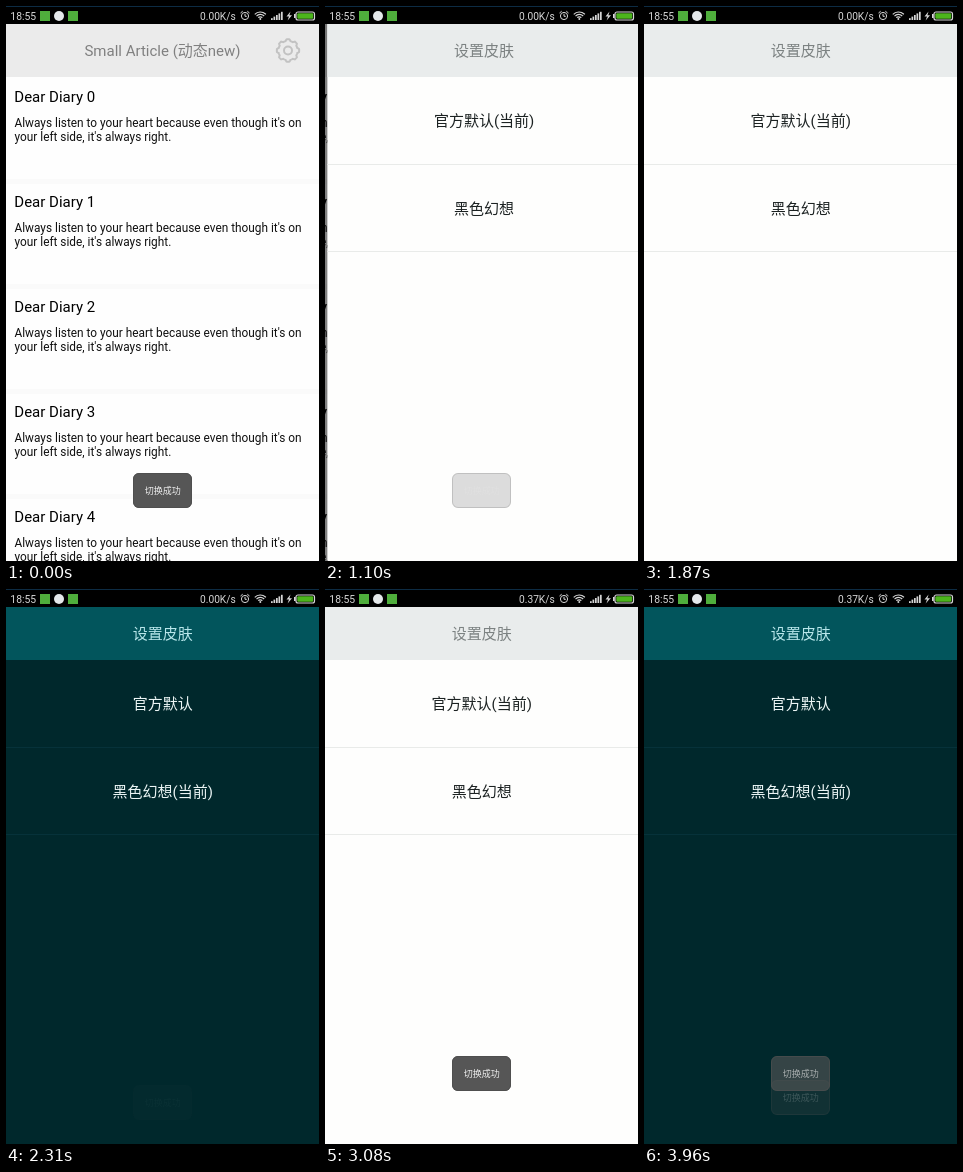
Animation of 313 by 555 pixels, one loop 4070 ms. Source, as an HTML page with a canvas:

```html
<!DOCTYPE html>
<html lang="zh">
<head>
<meta charset="utf-8">
<title>Skin switch</title>
<style>
html, body { margin: 0; width: 100%; height: 100%; overflow: hidden; background: #000; }
canvas { display: block; width: 313px; height: 555px; }
</style>
</head>
<body>
<canvas id="stage"></canvas>
<script>
const W = 313, H = 555, LOOP = 4070, STEP = 110;
const FONT = 'Roboto, "Noto Sans CJK SC", "Noto Sans CJK", sans-serif';
const canvas = document.getElementById('stage');
const ctx = canvas.getContext('2d');
const scale = window.devicePixelRatio || 1;
canvas.width = Math.round(W * scale);
canvas.height = Math.round(H * scale);

const LIGHT = { head: '#e9ecec', title: '#7c8282', bg: '#fefefd', text: '#1c2222', line: '#e9ebe9', press: '#e6e6e6' };
const DARK = { head: '#02555c', title: '#b8e6ea', bg: '#00282c', text: '#ebf5f5', line: '#06323a', press: '#0a3a40' };

const clamp = v => Math.max(0, Math.min(1, v));
const within = (t, a, b) => t >= a && t < b;

function rect(x, y, w, h, color) {
  ctx.fillStyle = color;
  ctx.fillRect(x, y, w, h);
}

function text(str, x, y, size, color, align = 'left') {
  ctx.font = `${size}px ${FONT}`;
  ctx.textAlign = align;
  ctx.fillStyle = color;
  ctx.fillText(str, x, y);
}

function roundRect(x, y, w, h, r) {
  ctx.beginPath();
  ctx.roundRect(x, y, w, h, r);
}

function arc(x, y, r, a = 0, b = Math.PI * 2) {
  ctx.beginPath();
  ctx.arc(x, y, r, a, b);
}

function poly(...pts) {
  ctx.beginPath();
  for (let i = 0; i < pts.length; i += 2) ctx.lineTo(pts[i], pts[i + 1]);
}

function gear(cx, cy) {
  ctx.strokeStyle = '#c2c2c2';
  ctx.lineWidth = 2;
  ctx.beginPath();
  for (let i = 0; i < 96; i++) {
    const a = i / 96 * Math.PI * 2;
    const r = 10.3 + 1.3 * clamp(0.5 + 1.2 * Math.cos(8 * a)) * 1.2 - 0.7;
    ctx.lineTo(cx + r * Math.cos(a), cy + r * Math.sin(a));
  }
  ctx.closePath();
  ctx.stroke();
  arc(cx, cy, 4);
  ctx.stroke();
}

function articles() {
  rect(0, 18, W, H - 18, '#fefefe');
  for (let i = 0; i < 5; i++) {
    const y = 71 + i * 105;
    text('Dear Diary ' + i, 8.3, y + 24.5, 15, '#000');
    text("Always listen to your heart because even though it's on", 8.5, y + 50.3, 11.85, '#111');
    text("your left side, it's always right.", 8.5, y + 64, 11.85, '#111');
    rect(0, y + 102, W, 5, '#fafafa');
  }
  rect(0, 18, W, 53, '#ebebeb');
  text('Small Article (动态new)', 156.5, 50.3, 15, '#808080', 'center');
  gear(282, 44.5);
}

function settings(dark, pressed) {
  const c = dark ? DARK : LIGHT;
  const now = '(当前)';
  const rows = ['官方默认' + (dark ? '' : now), '黑色幻想' + (dark ? now : '')];
  rect(0, 18, W, H - 18, c.bg);
  rect(0, 18, W, 53, c.head);
  text('设置皮肤', 156.7, 50.4, 15, c.title, 'center');
  rows.forEach((label, i) => {
    const y = 71 + i * 88;
    if (pressed === i) rect(0, y, W, 86, c.press);
    rect(0, y + 87 - i, W, 1, c.line);
    text(label, 156.7, y + 48.9, 15, c.text, 'center');
  });
}

function toast(alpha, dy = 0) {
  if (alpha <= 0) return;
  ctx.save();
  ctx.globalAlpha = Math.min(1, alpha);
  ctx.translate(0, dy);
  roundRect(127, 467, 59, 35, 6);
  ctx.fillStyle = '#565656';
  ctx.fill();
  roundRect(127.5, 467.5, 58, 34, 5.5);
  ctx.strokeStyle = '#4f4f4f';
  ctx.lineWidth = 1;
  ctx.stroke();
  text('切换成功', 156.7, 488.2, 9, '#f0f0f0', 'center');
  ctx.restore();
}

function risingToast(t, start) {
  const p = clamp((t - start) / 200);
  toast(p, 30 * (1 - p));
}

const fade = (t, start) => 1 - clamp((t - start) / 262);

function statusBar(speed) {
  const ink = '#d6d6d6';
  rect(0, 0, W, 18, '#000');
  rect(0, 0, W, 1, '#0d2c44');
  text('18:55', 4.3, 13.6, 10.4, ink);
  rect(34, 5, 10, 10, '#4fae3c');
  arc(53, 10, 5);
  ctx.fillStyle = '#e4e8ea';
  ctx.fill();
  rect(62, 5, 10, 10, '#4fae3c');
  text(speed, 194, 13.5, 10.2, ink);

  // alarm clock
  ctx.strokeStyle = ctx.fillStyle = ink;
  ctx.lineWidth = 1;
  arc(239, 10, 3.6);
  ctx.stroke();
  poly(239, 7.8, 239, 10.3, 240.8, 10.3);
  ctx.stroke();
  poly(234.5, 7, 236.7, 5.2);
  ctx.stroke();
  poly(241.3, 5.2, 243.5, 7);
  ctx.stroke();

  // wifi
  ctx.lineWidth = 1.2;
  for (const r of [2.8, 5.2, 7.6]) {
    arc(254.3, 13.6, r, -Math.PI * 0.76, -Math.PI * 0.24);
    ctx.stroke();
  }
  arc(254.3, 13, 1);
  ctx.fill();

  // signal
  for (let i = 0; i < 5; i++) rect(265 + i * 2.5, 12.2 - i * 1.6, 1.7, 1.8 + i * 1.6, ink);

  // charging battery
  poly(284.5, 5.5, 280.5, 10.6, 283, 10.6, 281.6, 14.5, 286, 9.2, 283.4, 9.2);
  ctx.fill();
  rect(288, 8, 1.6, 4, ink);
  roundRect(290, 6, 18.5, 8, 2);
  ctx.stroke();
  roundRect(291.3, 7.3, 15.9, 5.4, 1);
  ctx.fillStyle = '#4cb51c';
  ctx.fill();
}

function pressedRow(t) {
  if (within(t, 1760, 1870) || within(t, 3300, 3520)) return 1;
  return within(t, 2530, 2640) ? 0 : -1;
}

function draw(t) {
  ctx.setTransform(canvas.width / W, 0, 0, canvas.height / H, 0, 0);
  const slide = 1 - Math.pow(1 - clamp((t - 650) / 560), 3);
  const settled = t >= 1210;
  if (!settled) {
    ctx.save();
    ctx.translate(-75.6 * slide, 0);
    articles();
    ctx.restore();
    if (slide > 0) rect(0, 18, W, H - 18, `rgba(0,0,0,${0.5 * slide})`);
  }
  if (slide > 0) {
    const dark = within(t, 2310, 2640) || t >= 3960;
    ctx.save();
    ctx.translate(settled ? 0 : W * (1 - slide), 0);
    settings(dark, pressedRow(t));
    ctx.restore();
  }
  if (t < 1210) toast(fade(t, 890));
  else if (t < 3960) risingToast(t, 2304);
  else {
    risingToast(t, 3920);
    toast(fade(t, 3860));
  }
  statusBar(t < 3080 ? '0.00K/s' : '0.37K/s');
}

const begin = performance.now();
function tick() {
  const t = (performance.now() - begin) % LOOP;
  draw(Math.floor(t / STEP) * STEP);
  requestAnimationFrame(tick);
}
tick();
</script>
</body>
</html>
```
